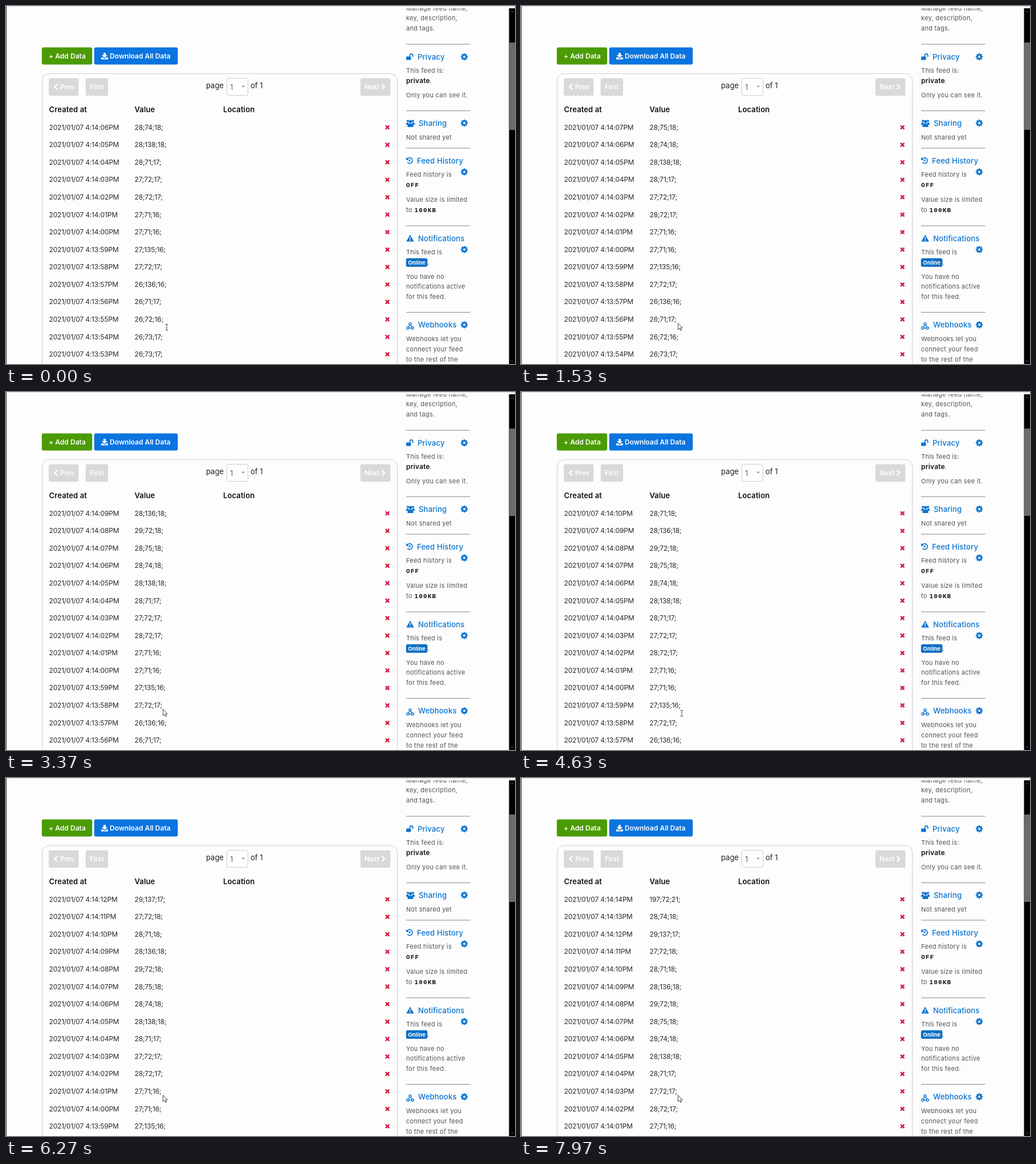
An HTML page for the animation above (8 s loop, 893 px wide and 627 px high).

```html
<!DOCTYPE html>
<html lang="en">
<head>
<meta charset="utf-8">
<title>Feed data</title>
<style>
html, body { margin: 0; width: 100%; height: 100%; overflow: hidden; background: #fdfdfd; }
svg { display: block; width: 893px; height: 627px; font-family: Inter, "Open Sans", sans-serif; }
.cell { font-size: 12px; letter-spacing: -.18px; fill: #2a2a2a; }
.head { font-size: 13px; font-weight: 600; letter-spacing: .12px; fill: #111; }
.page { font-size: 13px; fill: #222; }
.btn { font-size: 12px; font-weight: 600; letter-spacing: .05px; fill: #fff; }
.off { font-size: 11.5px; font-weight: 600; fill: #fff; }
.title { font-size: 13.2px; font-weight: 500; letter-spacing: .1px; fill: #0d74cf; }
.note { font-size: 11px; letter-spacing: .28px; fill: #525252; }
.bold { font-size: 11.9px; font-weight: 600; letter-spacing: .25px; fill: #111; }
.mono { font: bold 11px "Liberation Mono", monospace; letter-spacing: 1.15px; fill: #111; }
.badge { font-size: 9.6px; font-weight: 700; letter-spacing: .1px; fill: #fff; }
</style>
</head>
<body>
<svg id="stage" viewBox="0 0 893 627"></svg>
<script>
const NS = 'http://www.w3.org/2000/svg';
const stage = document.getElementById('stage');
const BLUE = '#0d74cf', RED = '#d5183f';
const LOOP = 8000, FIRST_ROW = 800, ROW_EVERY = 1000;
const ROWS = 14, PITCH = 30.58;
const START = 13 * 60 + 53; // minutes and seconds of the oldest reading

const VALUES = ('26;73;17 26;73;17 26;72;16 26;71;17 26;136;16 27;72;17 27;135;16 27;71;16 ' +
  '27;71;16 28;72;17 27;72;17 28;71;17 28;138;18 28;74;18 28;75;18 29;72;18 ' +
  '28;136;18 28;71;18 27;72;18 29;137;17 28;74;18 197;72;21').split(' ');

function add(tag, attrs, parent = stage) {
  const el = document.createElementNS(NS, tag);
  for (const key in attrs) el.setAttribute(key, attrs[key]);
  return parent.appendChild(el);
}

function text(x, y, cls, str = '') {
  const el = add('text', { x, y, class: cls });
  el.textContent = str;
  return el;
}

function rect(x, y, width, height, fill, rx = 0, more = {}) {
  return add('rect', { x, y, width, height, fill, rx, ...more });
}

function stroke(d, color, width) {
  return add('path', { d, fill: 'none', stroke: color, 'stroke-width': width });
}

function fill(d, color) {
  return add('path', { d, fill: color, 'fill-rule': 'evenodd' });
}

function gear(y) {
  const g = add('g', { transform: `translate(804 ${y})`, fill: 'none', stroke: BLUE });
  add('circle', { r: 3.4, 'stroke-width': 2.8 }, g);
  for (let i = 0; i < 8; i++)
    add('path', { d: 'M0-4V-6.2', 'stroke-width': 2.4, transform: `rotate(${i * 45})` }, g);
}

function drawToolbar() {
  rect(62.8, 72.6, 88.4, 29.8, '#4b9b05', 3);
  text(75, 92, 'btn', '+ Add Data');
  rect(154.8, 72.6, 146.6, 29.8, '#0a74df', 3);
  fill('M171 82h4v4h3.2l-5.2 5-5.2-5h3.2zM167 90h3l3 2.6 3-2.6h3v3.5h-12z', '#fff');
  text(182, 92, 'btn', 'Download All Data');

  stroke('M63.5 640V130a11.5 11.5 0 0 1 11.5-11.5H675a11.5 11.5 0 0 1 11.5 11.5V640', '#cdcdd6', 1);
  rect(75, 126.6, 52.4, 30.6, '#d9d9d9', 3);
  rect(139.8, 126.6, 39.2, 30.6, '#d9d9d9', 3);
  rect(621.8, 126.6, 52.6, 30.6, '#d9d9d9', 3);
  stroke('M90 137l-4.5 4.5 4.5 4.5M659.5 137l4.5 4.5-4.5 4.5', '#fff', 2.4);
  text(95, 146, 'off', 'Prev');
  text(147, 146, 'off', 'First');
  text(629, 146, 'off', 'Next');

  text(351, 143.5, 'page', 'page');
  rect(387.5, 126.5, 37, 30, '#fefefe', 3, { stroke: '#cbcbcb' });
  text(393, 147, 'page', '1').style.fill = '#666';
  fill('M413.5 139.8h5.4l-2.7 3z', '#888');
  text(429, 143.5, 'page', 'of 1');

  text(75.5, 185.5, 'head', 'Created at');
  text(225.5, 185.5, 'head', 'Value');
  text(381, 185.5, 'head', 'Location');
}

function drawSidebar() {
  const notes = [
    [8.3, 'Manage feed name,'], [25.3, 'key, description,'], [43, 'and tags.'],
    [116.5, 'This feed is:'], [159.5, 'Only you can see it.'], [233.5, 'Not shared yet'],
    [299, 'Feed history is'], [343, 'Value size is limited'], [360.5, 'to'],
    [435, 'This feed is'], [477.5, 'You have no'], [495, 'notifications active'],
    [512.5, 'for this feed.'], [587, 'Webhooks let you'], [605, 'connect your feed'],
    [622.5, 'to the rest of the']
  ];
  for (const [y, str] of notes) text(702, y, 'note', str);

  text(702, 134.5, 'bold', 'private');
  text(743, 134.5, 'note', '.');
  text(702, 317, 'mono', 'OFF');
  text(716.5, 360.5, 'mono', '100KB');
  rect(701.8, 441.7, 37.6, 15, '#0d6fc4', 3);
  text(705.2, 452.9, 'badge', 'Online');
  text(739.5, 453, 'note', '.');

  text(722, 94, 'title', 'Privacy');
  text(724, 210, 'title', 'Sharing');
  text(721, 275.7, 'title', 'Feed History');
  text(723, 411.7, 'title', 'Notifications');
  text(723, 563.3, 'title', 'Webhooks');

  for (const y of [67, 183.5, 249, 385, 536.5]) stroke(`M702 ${y}H814.5`, '#85888f', 1.2);
  for (const y of [89, 205, 290.5, 426.5, 558.3]) gear(y);

  // padlock
  rect(702, 88.5, 8.5, 6, BLUE, 1);
  stroke('M708.5 89V86.5a2.6 2.6 0 0 1 5.2 0V89', BLUE, 1.7);
  // people
  for (const [x, y, r] of [[705, 201.3, 2], [714, 201.3, 2], [709.5, 202.4, 2.7]])
    add('circle', { cx: x, cy: y, r, fill: BLUE });
  fill('M702 208v-2q0-2 2-2h2.4l-1 4zM717 208v-2q0-2-2-2h-2.4l1 4z', BLUE);
  fill('M704.5 212v-2.5q0-3.6 3-3.8h4q3 .2 3 3.8v2.5z', BLUE);
  // history
  stroke('M703.8 268a5 5 0 1 1 .4 5.8M708.7 268v3.3h-2.4', BLUE, 1.6);
  fill('M702 264.7v5h5z', BLUE);
  // warning
  fill('M709 400.5l6.8 12h-13.6zM708.1 404.5h1.8l-.3 4h-1.2zM708.2 409.3h1.6v1.6h-1.6z', BLUE);
  // hook
  for (const [x, y] of [[709, 557], [704.8, 564], [713.3, 564]])
    add('circle', { cx: x, cy: y, r: 2, fill: 'none', stroke: BLUE, 'stroke-width': 1.4 });
  stroke('M708 559l-2.4 4M710 559l2.4 4M707 564h4.2', BLUE, 1.4);
}

function drawFrame() {
  rect(0, 0, 893, 4, '#fdfdfd');
  rect(0, 0, 893, 1, '#dedfd5');
  rect(0, 0, 1, 627, '#3c3c3c');
  rect(882.5, 4, 10.5, 623, '#000');
  rect(882.5, 64, 10.5, 153, '#6b6b6b');
  stroke('M886 11.2l2-2 2 2M886 620.8l2 2 2-2', '#666', 1);
}

function makeRows() {
  return Array.from({ length: ROWS }, (_, i) => {
    const y = 212.2 + i * PITCH;
    stroke(`M666 ${y - 2.9}l6.4 6.4m0-6.4l-6.4 6.4`, RED, 2.5);
    return { date: text(75.5, y + 4.4, 'cell'), value: text(225.5, y + 4.4, 'cell') };
  });
}

const pad = n => String(n).padStart(2, '0');
function stamp(i) {
  const s = START + i;
  return `2021/01/07 4:${pad(Math.floor(s / 60))}:${pad(s % 60)}PM`;
}

drawToolbar();
drawSidebar();
const rows = makeRows();
drawFrame();
const arrow = add('path', {
  d: 'M275.5 555.5v11.4l2.6-2.5 1.8 4.1 1.7-.8-1.8-3.9h3.5z',
  fill: '#fff', stroke: '#333', 'stroke-width': .9
});
const beam = stroke('M279.5 557.5h2l.5.5.5-.5h2M282 558v9.5M279.5 568h2l.5-.5.5.5h2', '#444', 1);

let shown = -1;
function render(t) {
  const count = Math.max(0, Math.floor((t - FIRST_ROW) / ROW_EVERY) + 1);
  if (count === shown) return;
  shown = count;
  rows.forEach((row, i) => {
    const n = ROWS - 1 + count - i;
    row.date.textContent = stamp(n);
    row.value.textContent = VALUES[n] + ';';
  });
  // the pointer becomes a text cursor where the value below it is wide enough
  const overText = count < 5 && count % 2 === 0;
  beam.style.display = overText ? '' : 'none';
  arrow.style.display = overText ? 'none' : '';
}

const begin = performance.now();
function tick() {
  render((performance.now() - begin) % LOOP);
  requestAnimationFrame(tick);
}
tick();
</script>
</body>
</html>
```
